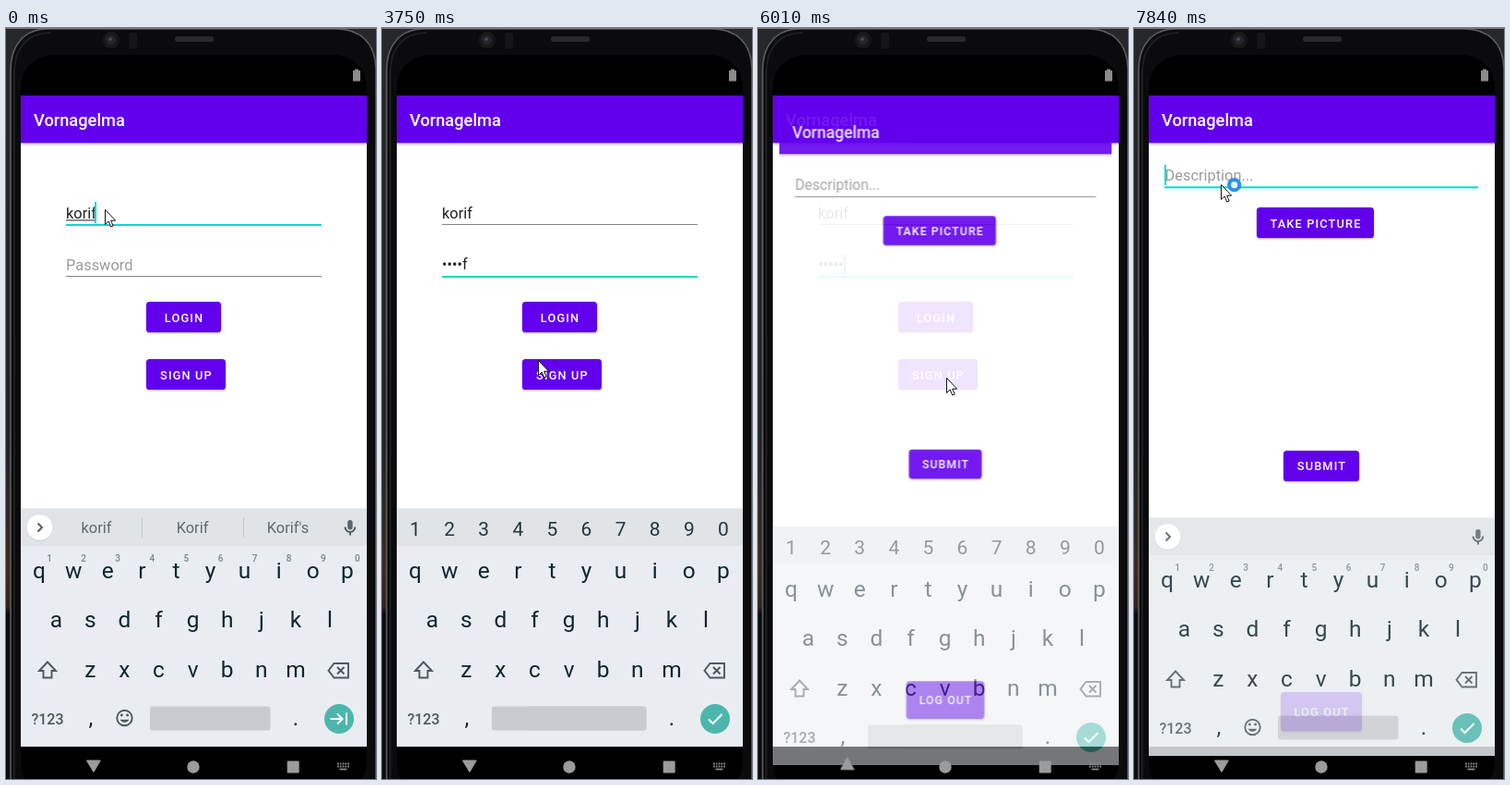
Recreate the animation shown at these times as an HTML page. Size 401x812 px, loop 7.99 s.

```html
<!DOCTYPE html>
<html lang="en">
<head>
<meta charset="utf-8">
<title>Sign up demo</title>
<style>
html, body { margin: 0; width: 100%; height: 100%; overflow: hidden; background: #0b0b0d; }
svg { display: block; font-family: Roboto, sans-serif; }

/* One clock for every part: hard steps over a 7.99 s loop. */
.early, .late, .rich, .digits, .user-on, .user-off, .hint, .pass-on, .login, .home,
.desc-on, .keys, .mouse, .busy, .ripple, .back, .ime, .pass::before, .pass::after {
  animation: 7.99s step-end infinite;
}
.early { animation-name: early; }
.late { animation-name: late; }
.rich { animation-name: rich; }
.digits { animation-name: digits; }
.user-on { animation-name: user-on; }
.user-off { animation-name: user-off; }
.pass-on { animation-name: user-off; }
.hint { animation-name: hint; }
.login { animation-name: login; }
.home { animation-name: home; transform-origin: 203.5px 425px; }
.desc-on, .busy { animation-name: desc-on; }
.keys { animation-name: keys; }
.mouse { animation-name: mouse; }
.ripple { animation-name: ripple; }
.back { animation-name: back; transform-origin: 94.7px 798.5px; }
.ime { animation-name: ime; }

@keyframes early { 0% { opacity: 1 } 10.513%, to { opacity: 0 } }
@keyframes late { 0% { opacity: 0 } 10.513%, to { opacity: 1 } }
@keyframes rich { 0% { opacity: 1 } 10.513% { opacity: 0 } 98.122%, to { opacity: 1 } }
@keyframes digits { 0% { opacity: 0 } 10.513% { opacity: 1 } 98.122%, to { opacity: 0 } }
@keyframes user-on { 0% { opacity: 1 } 8.76%, to { opacity: 0 } }
@keyframes user-off { 0% { opacity: 0 } 8.76%, to { opacity: 1 } }
@keyframes hint { 0% { opacity: 1 } 19.399%, to { opacity: 0 } }
@keyframes login { 0% { opacity: 1 } 77.096%, to { opacity: 0 } }
@keyframes desc-on { 0% { opacity: 0 } 95.118%, to { opacity: 1 } }
@keyframes home {
  0% { opacity: 0; transform: none }
  75.219% { opacity: .9; transform: scale(.96) }
  77.096% { opacity: 1; transform: scale(.997) }
  78.973%, to { opacity: 1; transform: none }
}
@keyframes keys {
  0% { opacity: 1; transform: none }
  75.219% { opacity: .5; transform: translateY(20px) }
  77.096% { opacity: 0; transform: none }
  98.122%, to { opacity: .84; transform: translateY(10px) }
}
@keyframes ime { 0% { opacity: 1 } 77.096% { opacity: 0 } 96.62%, to { opacity: 1 } }
@keyframes back {
  0% { transform: none }
  75.219% { transform: rotate(60deg) }
  77.096% { transform: rotate(90deg) }
  96.62% { transform: rotate(82deg) }
  98.122%, to { transform: none }
}
@keyframes ripple {
  0% { opacity: 0; r: 38px }
  57.196% { opacity: .24; r: 38px }
  59.073% { opacity: .16; r: 60px }
  60.951%, to { opacity: 0; r: 60px }
}
@keyframes mouse {
  0% { transform: translate(107px, 196px) }
  4.255% { transform: translate(104px, 208px) }
  5.757% { transform: translate(96px, 242px) }
  7.259% { transform: translate(91px, 258px) }
  45.306% { transform: translate(128px, 306px) }
  46.933% { transform: translate(169px, 359px) }
  48.811% { transform: translate(195px, 376px) }
  50.438% { transform: translate(207px, 384px) }
  52.19% { transform: translate(206px, 382px) }
  53.692% { transform: translate(205px, 379px) }
  55.319% { transform: translate(204px, 378px) }
  88.235% { transform: translate(165px, 292px) }
  89.862% { transform: translate(107px, 178px) }
  91.739%, to { transform: translate(94px, 169px) }
}

/* Masked password with its trailing caret */
.pass { font: 16.4px/24.6px Roboto, sans-serif; color: #212121; white-space: nowrap; }
.pass::before { content: ""; animation-name: typing; }
.pass::after {
  content: ""; display: inline-block; width: 2px; height: 23px;
  background: #03dac5; vertical-align: top; animation-name: blink;
}
@keyframes typing {
  0% { content: "" }
  19.399% { content: "k" }
  23.279% { content: "•o" }
  28.66% { content: "••r" }
  32.665% { content: "•••i" }
  36.42% { content: "••••f" }
  52.19%, to { content: "•••••" }
}
@keyframes blink {
  0% { opacity: 0 }
  8.76% { opacity: 1 }
  15.894% { opacity: 0 }
  19.399% { opacity: 1 }
  43.554% { opacity: 0 }
  48.811% { opacity: 1 }
  60.951% { opacity: 0 }
  68.085%, to { opacity: 1 }
}

.field { font-size: 16.4px; fill: #212121; }
.ghost { font-size: 16.4px; fill: #9b9b9b; }
.title { font-size: 18.25px; font-weight: 500; fill: #fff; }
.btn rect { fill: #6200ee; filter: drop-shadow(0 1px 1px #0005); }
.btn text { font-size: 12.8px; font-weight: 500; letter-spacing: .089em; fill: #fff; }
.btn text, .keys text { text-anchor: middle; }
.teal { fill: #03dac5; }
.letter { font-size: 24.5px; fill: #12252e; }
.digit { font-size: 21px; fill: #26363e; }
.sup { font-size: 10px; font-weight: 500; fill: #7b8388; }
.word { font-size: 16.4px; fill: #62686c; }
.icon { fill: none; stroke: #4d585e; stroke-width: 1.9; }
.white { fill: none; stroke: #fff; stroke-width: 2; }
</style>
</head>
<body>
<svg width="401" height="812" viewBox="0 0 401 812">
  <defs>
    <linearGradient id="desk" x2="0" y2="1">
      <stop offset="0" stop-color="#26272a"/>
      <stop offset=".55" stop-color="#242326"/>
      <stop offset=".72" stop-color="#3d2a20"/>
      <stop offset=".77" stop-color="#33231b"/>
      <stop offset=".78" stop-color="#0c0c0d"/>
    </linearGradient>
    <linearGradient id="shade" x2="0" y2="1">
      <stop offset="0" stop-opacity=".22"/>
      <stop offset="1" stop-opacity="0"/>
    </linearGradient>
    <clipPath id="signup"><rect x="152" y="358" width="86" height="33" rx="3.6"/></clipPath>
    <clipPath id="glass"><path d="M16 812V64Q16 29 51 29H356Q391 29 391 64V812Z"/></clipPath>
    <g id="bar">
      <rect x="16" y="73" width="375" height="704" fill="#fff"/>
      <rect x="16" y="124" width="375" height="4" fill="url(#shade)"/>
      <rect x="16" y="73" width="375" height="51.3" fill="#6200ee"/>
      <text class="title" x="30" y="106">Vornagelma</text>
    </g>
  </defs>

  <!-- Phone body -->
  <rect width="401" height="812" fill="url(#desk)"/>
  <path d="M5 820V46C5 18 20 1 46 1H358C384 1 400 16 401 44V820Z" fill="#0b0b0d" stroke="#5b5d60" stroke-width="1.6"/>
  <path d="M9 812V48C9 22 23 5 48 5" fill="none" stroke="#1d1e20" stroke-width="2"/>
  <rect width="401" height="1" fill="#77797c"/>
  <rect x="183" y="9" width="42" height="6" rx="3" fill="#29292b"/>
  <circle cx="114" cy="13" r="9" fill="#19191c"/>
  <circle cx="114" cy="13" r="5" fill="#25272d"/>
  <circle cx="113" cy="12" r="1.8" fill="#4a4d58"/>
  <rect x="133" y="5" width="9" height="17" rx="3" fill="#161618"/>
  <rect x="16" y="29" width="375" height="800" rx="35"/>
  <path d="M376 46h2v-1.5h4V46h2v11.5h-8Z" fill="#8b8b8b"/>

  <g clip-path="url(#glass)">
    <g class="login">
      <use href="#bar"/>
      <text class="field" x="65" y="206">korif</text>
      <rect class="early" x="65" y="207.4" width="32" height="1" fill="#212121"/>
      <g class="user-on teal">
        <rect x="65" y="212" width="277" height="2"/>
        <rect x="96" y="188" width="2" height="23"/>
      </g>
      <rect class="user-off" x="65" y="212" width="277" height="1" fill="#858585"/>
      <text class="ghost hint" x="65" y="262">Password</text>
      <rect class="user-on" x="65" y="268" width="277" height="1" fill="#858585"/>
      <rect class="pass-on teal" x="65" y="268" width="277" height="2"/>
      <foreignObject x="65" y="244" width="270" height="24"><div class="pass"></div></foreignObject>
      <g class="btn"><rect x="152" y="296" width="81" height="33" rx="3.6"/><text x="193" y="318">LOGIN</text></g>
      <g class="btn"><rect x="152" y="358" width="86" height="33" rx="3.6"/><text x="195.5" y="380">SIGN UP</text></g>
      <g clip-path="url(#signup)"><circle class="ripple" cx="198" cy="375" r="38" fill="#fff"/></g>
    </g>

    <g class="home">
      <use href="#bar"/>
      <text class="ghost" x="33.5" y="165">Description...</text>
      <rect x="33" y="172" width="340" height="1" fill="#858585"/>
      <g class="desc-on teal">
        <rect x="33" y="171.3" width="340" height="2"/>
        <rect x="33" y="148" width="2" height="22"/>
      </g>
      <g class="btn"><rect x="133" y="194" width="127" height="33" rx="3.6"/><text x="197" y="215.5">TAKE PICTURE</text></g>
      <g class="btn"><rect x="162" y="457" width="82" height="33" rx="3.6"/><text x="203.5" y="478">SUBMIT</text></g>
      <g class="btn"><rect x="159" y="718" width="88" height="42.5" rx="3.6"/><text x="203.5" y="744">LOG OUT</text></g>
    </g>

    <!-- Keyboard -->
    <g class="keys">
      <rect x="16" y="519.5" width="375" height="257.5" fill="#e9edf1"/>
      <rect x="16" y="519.5" width="375" height="40.5" fill="#e0e4e7"/>
      <g id="letters"></g>
      <g class="digits" id="digits"></g>
      <text x="45" y="752.5" font-size="16" font-weight="500" fill="#4d585e">?123</text>
      <text class="letter" x="92" y="754">,</text>
      <text class="letter" x="314" y="754">.</text>
      <path class="icon" d="M45 685.5L54 695H49.5V702.5H40.5V695H36Z"/>
      <path class="icon" d="M355.5 687H371V702.5H355.5L349.5 694.7ZM359 691l7.5 7.5m0-7.5l-7.5 7.5"/>
      <rect x="156" y="733.5" width="130.5" height="26" rx="3" fill="#c8ccd0"/>
      <rect class="digits" x="119" y="733.5" width="167.5" height="26" rx="3" fill="#c8ccd0"/>
      <circle cx="361" cy="747" r="16" fill="#4db6ac"/>
      <path class="white early" d="M351.5 747H364M359 741.5l5.5 5.5-5.5 5.5M369 740.5v13"/>
      <path class="white late" d="M354 747.5l4.5 4.5 10-10"/>
      <g class="rich">
        <g id="sups"></g>
        <circle cx="36.5" cy="541" r="14" fill="#0001"/>
        <circle cx="36.5" cy="540" r="13.8" fill="#fff"/>
        <path class="icon" d="M34.5 535.5l4.5 4.5-4.5 4.5"/>
        <rect x="370.2" y="532" width="5.4" height="10.5" rx="2.7" fill="#5b666c"/>
        <path class="icon" stroke-width="1.5" d="M367.5 539.5a5.4 5.4 0 0 0 10.8 0M372.9 545v3.5"/>
        <circle class="icon" cx="128.5" cy="746" r="8.2"/>
        <path d="M124 743a1.4 1.4 0 1 1 2.8 0 1.4 1.4 0 1 1-2.8 0M130.2 743a1.4 1.4 0 1 1 2.8 0 1.4 1.4 0 1 1-2.8 0M123.8 747.8h9.4a5 4.5 0 0 1-9.4 0Z" fill="#4d585e"/>
      </g>
      <g class="early word">
        <text x="98" y="546">korif</text>
        <text x="202" y="546">Korif</text>
        <text x="305.5" y="546">Korif's</text>
        <path d="M147.5 529v22M257.5 529v22" stroke="#c3c8cb"/>
      </g>
    </g>

    <!-- Navigation bar -->
    <g fill="#9b9b9b">
      <path class="back" d="M87 792.2Q87 791.5 88 791.5H102Q103 791.5 102.5 792.4L95.5 804.4Q95 805 94.5 804.4Z"/>
      <circle cx="203" cy="799" r="6.7"/>
      <rect x="304.7" y="792.5" width="13" height="13" rx="1"/>
      <g class="ime" fill="none" stroke="#858585" stroke-width="1.8">
        <path d="M359 795.5h13M359 798.5h13" stroke-dasharray="1.8 1"/>
        <path d="M361.5 801.5h8"/>
      </g>
    </g>
  </g>

  <g class="mouse">
    <path d="M.5 .5V16.5L4.2 13 6.7 19 9.2 18 6.7 12.2H11.7Z" fill="#fff" stroke="#111"/>
    <circle class="busy" cx="14.7" cy=".7" r="5.6" fill="#e4f2fc" stroke="#2c92e4" stroke-width="4"/>
  </g>
</svg>
<script>
const PITCH = 37.1;

function row(id, chars, x, y, style) {
  [...chars].forEach((char, i) => {
    const key = document.createElementNS("http://www.w3.org/2000/svg", "text");
    key.setAttribute("x", x + i * PITCH);
    key.setAttribute("y", y);
    key.setAttribute("class", style);
    key.textContent = char;
    document.getElementById(id).append(key);
  });
}

row("letters", "qwertyuiop", 36, 594.5, "letter");
row("letters", "asdfghjkl", 54.3, 648, "letter");
row("letters", "zxcvbnm", 91.3, 701.7, "letter");
row("digits", "1234567890", 36, 548.5, "digit");
row("sups", "1234567890", 47, 576.5, "sup");
</script>
</body>
</html>
```
